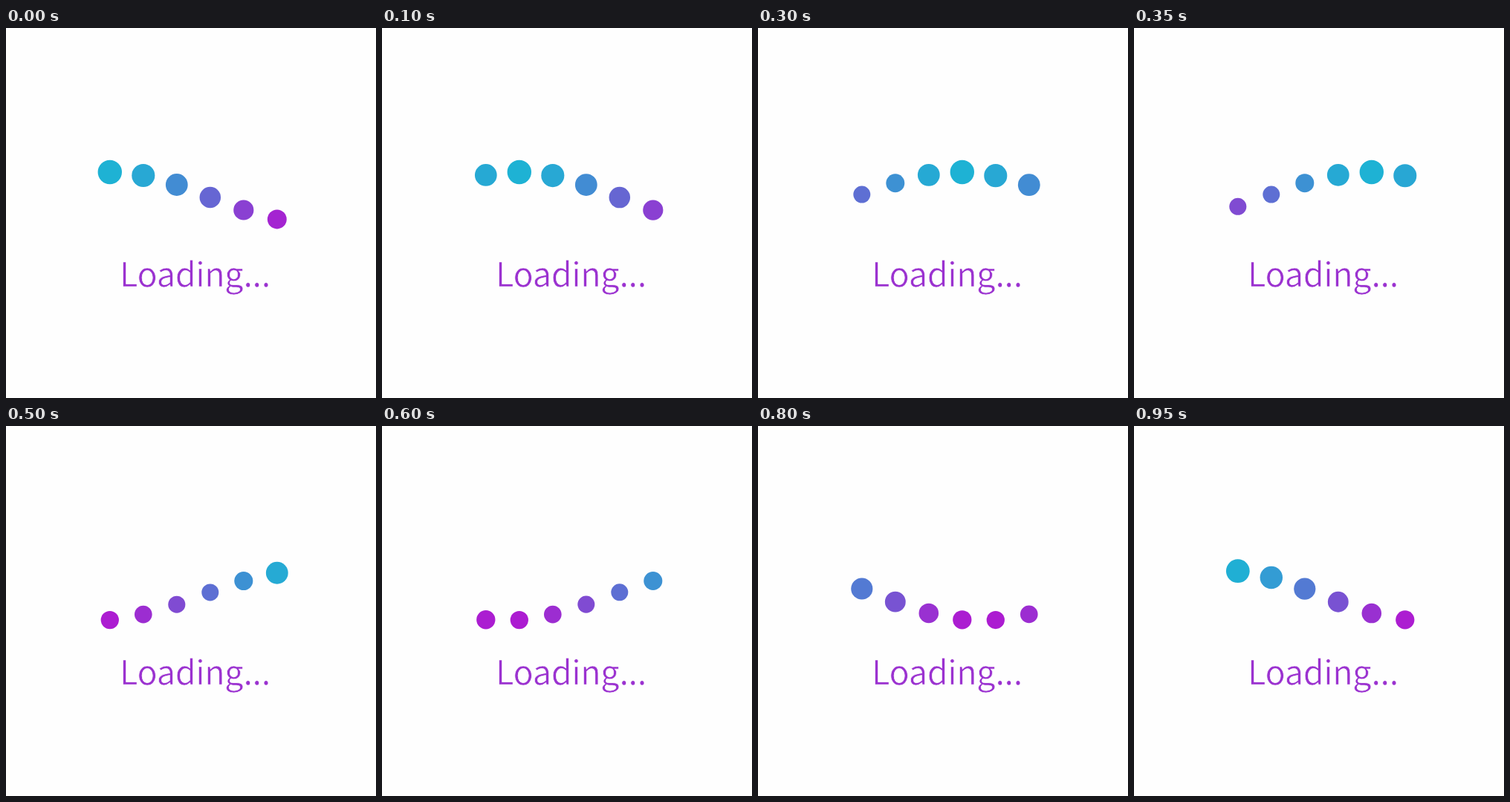
An HTML page for the animation above (1000 ms loop, 498 px wide and 498 px high).

```html
<!DOCTYPE html>
<html lang="en">
<head>
<meta charset="utf-8">
<title>Loading</title>
<style>
  html, body { margin: 0; width: 100%; height: 100%; overflow: hidden; background: #fefefe; }
  svg { display: block; width: 100vw; height: 100vh; }
  text {
    font: 400 45px "Noto Sans CJK JP", "Noto Sans CJK SC", "Noto Sans CJK", "Noto Sans", sans-serif;
    letter-spacing: -0.35px;
    fill: #9b32d0;
    stroke: #fefefe; /* trims the letters to a lighter weight */
    stroke-width: 0.7px;
  }
</style>
</head>
<body>
<svg viewBox="0 0 498 498">
  <g id="dots"></g>
  <text x="153" y="348">Loading...</text>
</svg>
<script>
const LOOP = 1000, STEP = 50, COUNT = 6;

// Phases are measured in dot-to-dot delays; phase 0 is the top of the bounce
const FALL = 6.45, RISE = 6, PERIOD = FALL + RISE;
const TOP = 194, BOTTOM = 262;
const CYAN = [30, 178, 212], PURPLE = [174, 26, 209];

const mix = (a, b, k) => a + (b - a) * k;

// 25 poses in 20 steps: after the first four steps, every third one skips a pose
function phaseAt(ms) {
  const step = Math.floor(ms / STEP);
  const pose = step + Math.max(0, Math.floor((step - 4) / 3));
  return pose / 25 * PERIOD;
}

// Dots grow steadily while rising and shrink quickly once past the top
function radius(s) {
  if (s < 0) return mix(16.2, 12.3, -s / RISE);
  return mix(10.2, 12.3, s / FALL) + 6 * Math.exp(-((s / 1.75) ** 2));
}

const dots = Array.from({ length: COUNT }, (_, i) => {
  const dot = document.createElementNS("http://www.w3.org/2000/svg", "circle");
  dot.setAttribute("cx", 139.8 + 45 * i);
  return document.getElementById("dots").appendChild(dot);
});

function draw(now) {
  const phase = phaseAt(now % LOOP);
  dots.forEach((dot, i) => {
    const s = (phase - i + RISE + PERIOD) % PERIOD - RISE;
    const drop = (1 - Math.cos(Math.PI * s / (s < 0 ? RISE : FALL))) / 2;
    dot.setAttribute("cy", mix(TOP, BOTTOM, drop));
    dot.setAttribute("r", radius(s));
    dot.setAttribute("fill", `rgb(${CYAN.map((c, j) => Math.round(mix(c, PURPLE[j], drop)))})`);
  });
}

const start = performance.now();
function tick(now) {
  draw(Math.max(0, now - start));
  requestAnimationFrame(tick);
}
draw(0);
requestAnimationFrame(tick);
</script>
</body>
</html>
```
